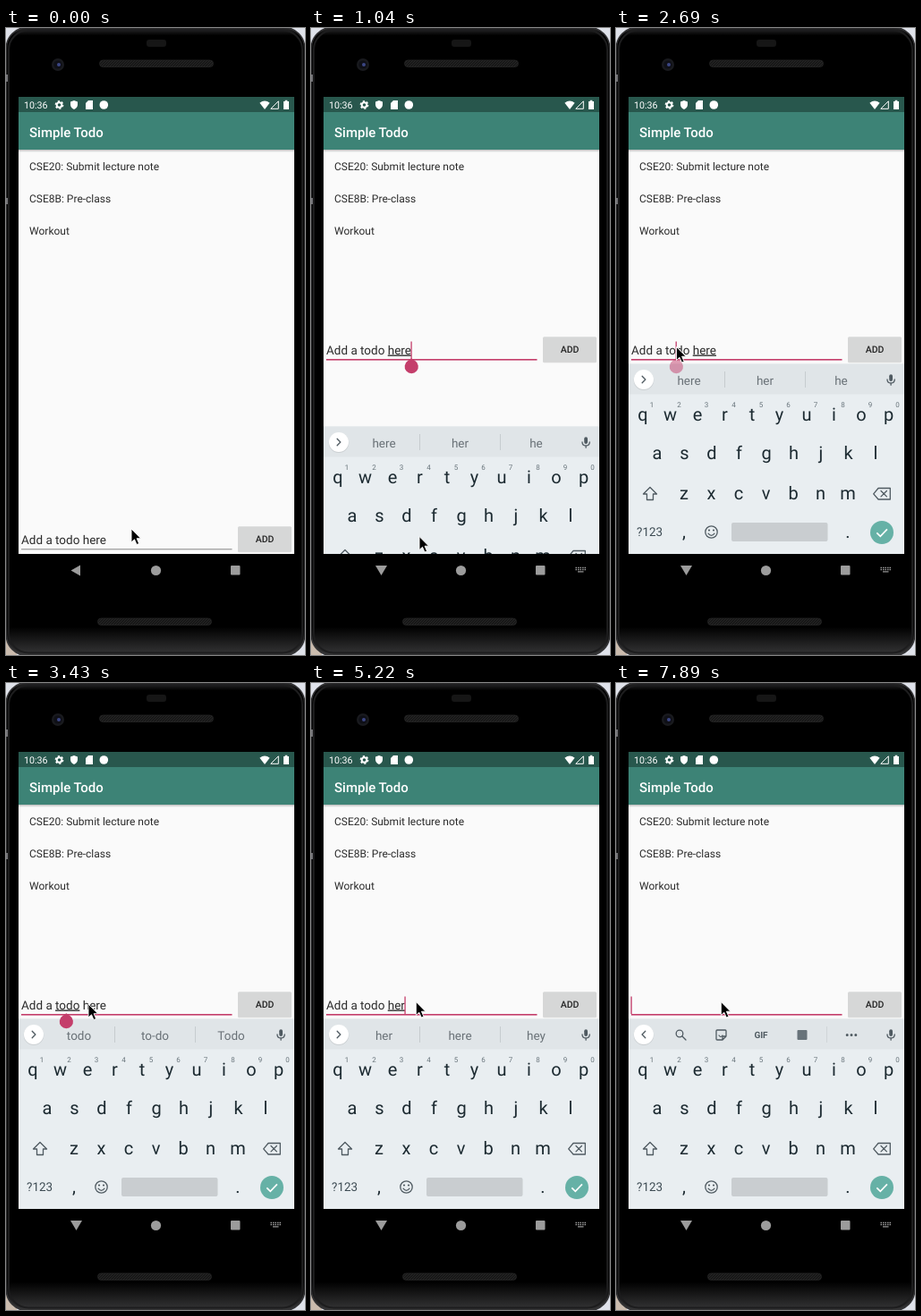
Animation, 334 px wide and 701 px high, one loop 8 s. Source, as an HTML page:

```html
<!DOCTYPE html>
<html lang="en">
<head>
<meta charset="utf-8">
<title>Todo app</title>
<style>
html, body { margin: 0; width: 100%; height: 100%; overflow: hidden; background: #dfe2ea; }
svg { display: block; font-family: Roboto, sans-serif; text-rendering: geometricPrecision; }
text { white-space: pre; }
.mid { text-anchor: middle; }
.line { fill: none; stroke: #4f5a61; stroke-width: 1.3; stroke-linejoin: round; stroke-linecap: round; }
.nav { fill: #9c9c9c; }
.key { font-size: 20px; fill: #1c2a31; }
.digit { font-size: 8px; fill: #67737a; }
.tip { font-size: 13.5px; fill: #697177; }
.word { text-decoration: underline #666 .8px; text-underline-offset: 1.2px; }
</style>
</head>
<body>
<svg width="334" height="701" viewBox="0 0 334 701">
  <defs>
    <clipPath id="screen"><rect x="14" y="77" width="308" height="511"/></clipPath>
    <pattern id="mesh" width="3" height="3" patternUnits="userSpaceOnUse">
      <rect width="3" height="3" fill="#171717"/><path d="M0 3L3 0" stroke="#2a2a2a" stroke-width=".8"/>
    </pattern>
    <linearGradient id="shade" x2="0" y2="1">
      <stop stop-color="#000" stop-opacity=".25"/><stop offset="1" stop-color="#000" stop-opacity="0"/>
    </linearGradient>
    <linearGradient id="body" gradientUnits="userSpaceOnUse" x1="0" y1="0" x2="0" y2="701">
      <stop stop-color="#2b2b2c"/><stop offset=".012"/><stop offset=".955"/><stop offset="1" stop-color="#363637"/>
    </linearGradient>
  </defs>

  <!-- phone body -->
  <rect y="684" width="12" height="17" fill="#cbbcae"/>
  <rect x=".3" y="-.5" width="333.4" height="702" rx="23" fill="url(#body)" stroke="#343436" stroke-width="1.6"/>
  <rect x="3" y="2.5" width="328" height="696" rx="22" fill="none" stroke="#1d1d1e" stroke-width="2"/>
  <path d="M0 52h2v8H0zM0 190h2v7H0z" fill="#77777b"/>
  <rect x="157" y="13" width="22" height="8" rx="3" fill="#161616"/>
  <circle cx="58" cy="41" r="7" fill="#191a1e"/>
  <circle cx="58" cy="41" r="4.6" fill="#0e0f16"/>
  <circle cx="59" cy="41" r="2" fill="#3b4684"/>
  <rect x="104.5" y="36" width="127" height="7.5" rx="3.7" fill="url(#mesh)" stroke="#262626" stroke-width=".8"/>
  <rect x="102.5" y="660" width="127" height="7.5" rx="3.7" fill="url(#mesh)" stroke="#262626" stroke-width=".8"/>

  <!-- app -->
  <rect x="14" y="77" width="308" height="511" fill="#fafafa"/>
  <rect x="14" y="136" width="308" height="3" fill="url(#shade)"/>
  <rect x="14" y="77" width="308" height="17" fill="#28574d"/>
  <rect x="14" y="94" width="308" height="42" fill="#3d8376"/>
  <g fill="#fff">
    <text x="20" y="90" font-size="10.7">10:36</text>
    <circle cx="59.5" cy="86" r="2.8" fill="none" stroke="#fff" stroke-width="2"/>
    <circle cx="59.5" cy="86" r="4.1" fill="none" stroke="#fff" stroke-width="1.6" stroke-dasharray="2.1 2.19"/>
    <path d="M76 81l4 1.6v3q0 3.6-4 5.4-4-1.8-4-5.4v-3z"/>
    <path d="M92 81h5v10h-8v-7z"/>
    <circle cx="109.3" cy="86" r="4.8"/>
    <path d="M289 91l-5.6-7.2q5.6-4.6 11.2 0z"/>
    <path d="M304.3 81.8v8.5h-8.5z" fill="none" stroke="#fff"/>
    <path d="M310 82h1.7v-1.2h2.6V82h1.7v9h-6z"/>
    <text x="26" y="121.5" font-size="15" font-weight="500">Simple Todo</text>
  </g>
  <g font-size="12" fill="#2b2b2b">
    <text x="26" y="159">CSE20: Submit lecture note</text>
    <text x="26" y="195">CSE8B: Pre-class</text>
    <text x="26" y="231">Workout</text>
  </g>

  <!-- navigation bar -->
  <g class="nav">
    <path id="back" d="M72.5 606.5l10.5-6v12z"/>
    <path id="hide" d="M78.5 612l-6.5-11h13z"/>
    <circle cx="167.5" cy="606.5" r="5.6"/>
    <rect x="251" y="601" width="10.5" height="10.5" rx="1"/>
    <g id="board">
      <path d="M295.5 603.5h11.5M295.5 605.7h11.5" stroke="#9c9c9c" stroke-width="1.3" stroke-dasharray="1.5 1"/>
      <path d="M298 607.3h6.5v1.2H298z"/>
    </g>
  </g>

  <!-- input row -->
  <g id="row">
    <rect x="259" y="346.2" width="60" height="28" rx="1.5" fill="#00000022"/>
    <rect x="259" y="345.3" width="60" height="28" rx="1.5" fill="#d6d7d7"/>
    <text class="mid" x="289" y="363" font-size="10.5" font-weight="500" fill="#222">ADD</text>
    <rect id="rule" x="17" width="235.5"/>
    <text id="input" x="17" y="364.5" font-size="13.5" fill="#2b2b2b"></text>
    <rect id="caret" y="350.5" width="1.3" height="19.5" fill="#c43e6b"/>
  </g>

  <!-- keyboard -->
  <g clip-path="url(#screen)">
    <g id="keyboard">
      <rect x="14" y="375.5" width="308" height="213" fill="#e9eef1"/>
      <rect x="14" y="375.5" width="308" height="34" fill="#e0e5e8"/>
      <circle cx="31" cy="393.8" r="11.3" fill="#00000018"/>
      <circle cx="31" cy="393" r="11" fill="#fff"/>
      <path id="chevron" class="line"/>
      <rect x="305.2" y="387.3" width="3.8" height="7.6" rx="1.9" fill="#4f5a61"/>
      <path class="line" d="M303 393q0 4 4.1 4t4.1-4M307.1 397v2.2"/>
      <g id="tips">
        <path d="M121.5 384v18M211.5 384v18" stroke="#c6cccf"/>
        <text class="tip mid" x="81.5" y="398.5"></text>
        <text class="tip mid" x="166.5" y="398.5"></text>
        <text class="tip mid" x="251.5" y="398.5"></text>
      </g>
      <g id="tools">
        <circle class="line" cx="71" cy="392" r="3.8"/>
        <path class="line" d="M74 395l4 4"/>
        <path class="line" d="M113 388h9q1 0 1 1v6l-4 4h-6q-1 0-1-1v-9q0-1 1-1zM123 395h-3q-1 0-1 1v3M115 394q2 3 4 0"/>
        <text class="mid" x="162" y="397" font-size="10" font-weight="700" fill="#4f5a61">GIF</text>
        <rect x="202.5" y="388" width="11" height="11" rx="1" fill="#68737a"/>
        <path d="M235.5 384v18" stroke="#d0d5d8"/>
        <path d="M258.2 393.5h.01M263 393.5h.01M267.8 393.5h.01" stroke="#4f5a61" stroke-width="3" stroke-linecap="round"/>
      </g>
      <g id="keys"></g>
      <path class="line" d="M38 513.5l7.5 7.5h-4v6.5h-7V521h-4z"/>
      <path class="line" d="M293 514.5h13.3v12.5H293l-5.3-6.2zM296 517.5l6.4 6.4M302.4 517.5l-6.4 6.4"/>
      <text x="23" y="568" font-size="13.5" fill="#3d4b53">?123</text>
      <circle class="line" cx="106.5" cy="563.5" r="6.7"/>
      <path class="line" d="M103 565.2q3.5 4.4 7 0"/>
      <path d="M104 561.5h.01M109 561.5h.01" stroke="#4f5a61" stroke-width="2.2" stroke-linecap="round"/>
      <rect x="129" y="553" width="107.5" height="21" rx="2" fill="#c9cdd0"/>
      <circle cx="297" cy="564" r="13" fill="#66b1a6"/>
      <path d="M291.3 564.3l4 4 7.6-8" fill="none" stroke="#fff" stroke-width="1.7"/>
    </g>
  </g>

  <path id="handle" fill="#c43e6b" d="M0-1L4 1.8A7.6 7.6 0 1 1-4 1.8z"/>
  <path id="pointer" d="M0 0V15L3.5 11.8 6 17.5 8.6 16.4 6.1 10.7H10.6Z" stroke="#fff" stroke-width=".9"/>
</svg>
<script>
const $ = id => document.getElementById(id);
const show = (id, on) => $(id).style.display = on ? '' : 'none';
const move = (id, x, y) => $(id).setAttribute('transform', `translate(${x} ${y})`);

const key = (char, x, y, type = 'key') => `<text class="${type} mid" x="${x}" y="${y}">${char}</text>`;
const keyRow = (chars, x, y, type) => [...chars].map((c, i) => key(c, x + 30.5 * i, y, type)).join('');
$('keys').innerHTML = keyRow('qwertyuiop', 30, 438.5) + keyRow('1234567890', 40, 424, 'digit') +
  keyRow('asdfghjkl', 46, 482) + keyRow('zxcvbnm', 76, 527) + key(',', 76, 570) + key('.', 259, 570);

const FULL = 'Add a todo here', DROP = 212, HIDDEN = 213;
const here = 'here her he', todo = 'todo to-do Todo';
const typed = (length, word, tips) => ({ text: FULL.slice(0, length), at: length, word, tips });

// Each step changes part of the state from its time (ms) on.
const steps = [
  [0, { x: 140, y: 560, text: FULL, at: 15, word: '', tips: here, caret: 0, handle: 0, focus: 0, drop: DROP, slide: HIDDEN, tools: 0 }],
  [300, { x: 130, y: 565 }],
  [450, { x: 121, y: 568.5 }],
  [740, { focus: 1, caret: 1 }],
  [890, { word: 'here', handle: 1 }],
  [1040, { drop: 0, slide: 70 }],
  [1190, { slide: 0 }],
  [1340, { x: 119, y: 525 }],
  [1490, { x: 109, y: 445 }],
  [1640, { x: 97, y: 384 }],
  [1790, { x: 77, y: 364, caret: 0 }],
  [1940, { x: 67.5, y: 356.5, caret: 1 }],
  [2240, { at: 8, handle: 0 }],
  [2690, { handle: .5 }],
  [2840, { handle: 1 }],
  [2990, { word: 'todo', tips: todo }],
  [3140, { caret: 0 }],
  [3290, { x: 76, y: 358 }],
  [3430, { x: 92, y: 359 }],
  [3580, { x: 109, y: 358, caret: 1 }],
  [3730, { x: 117.3, y: 356.5 }],
  [3880, { at: 15, handle: .5 }],
  [4030, { handle: 1 }],
  [4330, { word: 'here', tips: here }],
  [4770, { handle: .5, caret: 0 }],
  [4920, { handle: 0 }],
  [5220, { ...typed(14, 'her', 'her here hey'), caret: 1 }],
  [5370, typed(13, 'he', 'he her hey')],
  [5520, typed(10, 'todo', todo)],
  [5670, typed(7, 't', 't to the')],
  [5810, typed(4, '', 'a the to')],
  [5960, typed(1, 'A', 'A And At')],
  [6100, typed(0, '', '')],
  [6250, { tools: 1 }],
  [6400, { caret: 0 }],
  [6840, { caret: 1 }],
  [7440, { caret: 0 }],
  [7890, { caret: 1 }]
];

const caretX = at => 17 + (at ? $('input').getSubStringLength(0, at) : 0);

function draw(time) {
  const s = Object.assign({}, ...steps.filter(step => step[0] <= time).map(step => step[1]));
  const open = s.slide < HIDDEN;

  $('input').innerHTML = s.word
    ? s.text.replace(new RegExp(s.word + '$|' + s.word), '<tspan class="word">$&</tspan>')
    : s.text;
  const x = caretX(s.at);
  move('row', 0, s.drop);
  $('rule').setAttribute('fill', s.focus ? '#c43e6b' : '#858585');
  $('rule').setAttribute('y', s.focus ? 370 : 370.3);
  $('rule').setAttribute('height', s.focus ? 1.6 : 1);
  $('caret').setAttribute('x', x - .5);
  show('caret', s.caret);
  move('handle', x + .3, 370.3 + s.drop);
  $('handle').style.opacity = s.handle;
  move('pointer', s.x, s.y);

  show('keyboard', open);
  move('keyboard', 0, s.slide);
  show('back', !open);
  show('hide', open);
  show('board', open);
  show('tips', s.tips);
  show('tools', s.tools);
  $('chevron').setAttribute('d', s.tools ? 'M32.8 389.3l-3.7 3.7 3.7 3.7' : 'M29.2 389.3l3.7 3.7-3.7 3.7');
  const words = s.tips.split(' ');
  $('tips').querySelectorAll('text').forEach((el, i) => el.textContent = words[i] || '');
}

const start = performance.now();
function tick() {
  draw((performance.now() - start) % 8000);
  requestAnimationFrame(tick);
}
tick();
</script>
</body>
</html>
```
